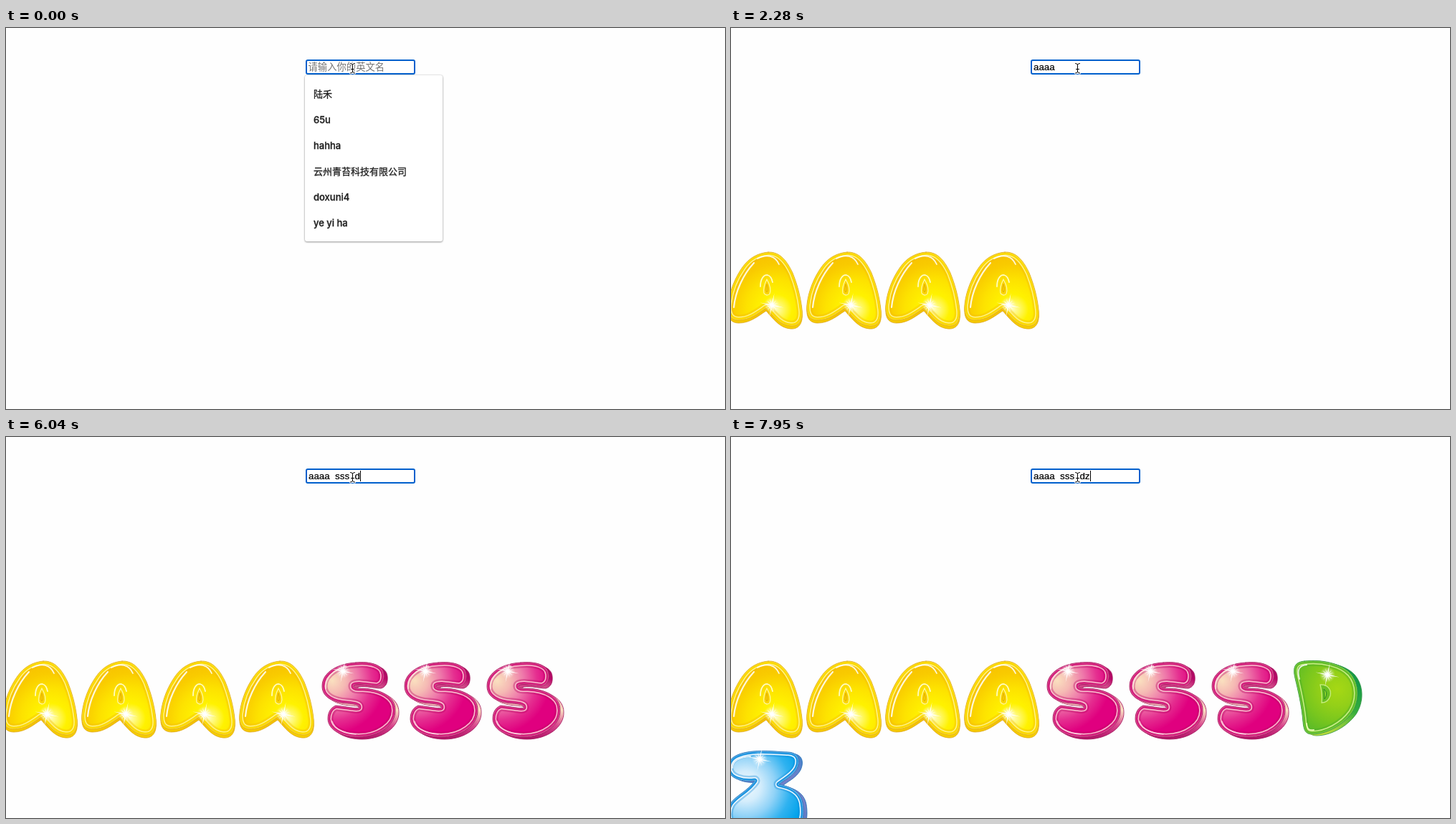
An HTML page that plays this animation: 1003x532 px, repeating every 8000 ms.

```html
<!DOCTYPE html>
<html lang="zh">
<head>
<meta charset="utf-8">
<title>Balloon letters</title>
<style>
html, body { margin: 0; width: 100%; height: 100%; overflow: hidden; background: #fefefe; }
svg { display: block; }
text { white-space: pre; }
.field { font: 13.333px "Liberation Sans", Arial, "Noto Sans CJK SC", "Noto Sans CJK", sans-serif; }
#typed { stroke: #000; stroke-width: .2px; }
.list text { font: 500 13px Inter, "Noto Sans CJK SC", "Noto Sans CJK", sans-serif; fill: #1f1f1f; stroke: #1f1f1f; stroke-width: .3px; }
.panel { fill: #fff; filter: drop-shadow(0 1px 1px rgba(0,0,0,.32)) drop-shadow(0 0 1px rgba(0,0,0,.22)); }
.line { fill: none; stroke-linecap: round; stroke-linejoin: round; }
</style>
</head>
<body>
<svg id="stage" width="1003" height="532" viewBox="0 0 1003 532">
  <defs>
    <radialGradient id="glow">
      <stop offset="0" stop-color="#fff"/>
      <stop offset=".3" stop-color="#fff" stop-opacity=".55"/>
      <stop offset="1" stop-color="#fff" stop-opacity="0"/>
    </radialGradient>
    <path id="beam" d="M480.5 49.5q2.6 0 3 2q.4-2 3-2M483.5 51V61M480.5 63q2.6 0 3-2q.4 2 3 2M481.5 57.5h4"/>
  </defs>

  <rect x="419" y="45" width="151" height="19" rx="2" fill="#fff" stroke="#005fcc" stroke-width="2"/>
  <text id="hint" class="field" x="421.5" y="59" fill="#757575">请输入你的英文名</text>
  <text id="typed" class="field" x="422" y="59"></text>
  <rect id="caret" y="47" width="1" height="15"/>

  <g id="list" class="list">
    <rect class="panel" x="417" y="66" width="192" height="232" rx="3"/>
  </g>
  <g id="letters"></g>

  <g class="line">
    <use href="#beam" stroke="#fff" stroke-width="3"/>
    <use href="#beam" stroke="#000"/>
  </g>
</svg>

<script>
const $ = id => document.getElementById(id);
const LOOP = 8000;
const LEFT = 422;

// time, text, caret shown
const steps = [
  [0, '', 0], [240, '', 1], [720, 'a', 1], [1020, 'aa', 1], [1500, 'aaa', 1],
  [1740, 'aaaa', 1], [2220, 'aaaa', 0], [2700, 'aaaa', 1],
  [3000, 'aaaa ', 1], [3240, 'aaaa  ', 1], [3540, 'aaaa  s', 1],
  [3780, 'aaaa  ss', 1], [4140, 'aaaa  sss', 1], [4610, 'aaaa  sss', 0],
  [4910, 'aaaa  sss ', 1], [5080, 'aaaa  sss  ', 1], [5620, 'aaaa  sss  ', 0],
  [6040, 'aaaa  sss  d', 1], [6510, 'aaaa  sss  d', 0], [6990, 'aaaa  sss  d', 1],
  [7530, 'aaaa  sss  d', 0], [7590, 'aaaa  sss  dz', 1]
];

const line = (d, color, w, o = 1) =>
  `<path class="line" d="${d}" stroke="${color}" stroke-width="${w}" opacity="${o}"/>`;

const stops = colors => colors.map((c, i) =>
  `<stop offset="${i / (colors.length - 1)}" stop-color="${c}"/>`).join('');

function spark(x, y, r) {
  let rays = '';
  for (let i = 0; i < 12; i++) {
    const len = r * (i % 3 ? .55 : 1);
    rays += `<path d="M0-.9L${len} 0L0 .9z" transform="rotate(${i * 30 + 12})"/>`;
  }
  return `<g transform="translate(${x} ${y})" fill="#fff"><circle r="${r * .65}" fill="url(#glow)"/>${rays}</g>`;
}

// A glossy letter: extruded side, face, inset rim line, details, sparkle
function balloon(id, o) {
  const [dx, dy] = o.depth, [cx, cy, r] = o.light, [top, bottom] = o.span;
  let side = '';
  for (let k = 4; k > 0; k--) {
    side += `<path d="${o.d}" transform="translate(${dx * k / 4} ${dy * k / 4})" fill="url(#${id}Side)" stroke="${o.edge}" stroke-width="${k == 4 ? .8 : 0}"/>`;
  }
  return `
    <linearGradient id="${id}Side" gradientUnits="userSpaceOnUse" x1="0" y1="${top}" x2="0" y2="${bottom}">${stops(o.side)}</linearGradient>
    <radialGradient id="${id}Body" gradientUnits="userSpaceOnUse" cx="${cx}" cy="${cy}" r="${r}">${stops(o.body)}</radialGradient>
    <clipPath id="${id}Clip"><path d="${o.d}"/></clipPath>
    <g id="${id}">
      ${side}
      <g clip-path="url(#${id}Clip)">
        <path d="${o.d}" fill="url(#${id}Body)"/>
        ${line(o.d, o.shade, 15, .35)}
        ${line(o.d, o.rim, 10)}
        ${line(o.d, o.band, 7)}
        ${line(o.d, o.rim, 2, .45)}
      </g>
      ${line(o.d, o.edge, .8)}
      ${o.extra}
      ${spark(...o.spark)}
    </g>`;
}

const glyphs = {
  A: {
    d: 'M52 313C69 312 79 327 86 342C92 357 97 374 99 393C101 410 93 417 83 416C68 415 59 402 49 391C37 399 26 408 11 408C-2 408-5 398-4 386C-2 367 6 348 16 334C25 321 38 314 52 313Z',
    depth: [0, 4], span: [312, 421], light: [64, 393, 84],
    side: ['#e8a800', '#f0b000', '#f6d000'], body: ['#fffcb0', '#fff200', '#fde200', '#f9cb00', '#f7bf00'],
    shade: '#f0b400', rim: '#fff38a', band: '#fbd800', edge: '#dfa81c', spark: [57, 387, 17],
    extra: line('M4 390C6 368 17 344 32 328', '#fff', 2.2, .85) +
      line('M37 322C50 315 62 318 67 330', '#fff', 1.8, .85) +
      line('M41 361C41 350 46 344 51 345C55 346 57 350 58 355', '#fffbc0', 1.8) +
      '<path d="M50 351C54 358 56 366 54 371C52 374 47 373 46 370C45 365 47 357 50 351Z" fill="#fbd400" stroke="#fff9a0" stroke-width="1.3"/>' +
      line('M50 358C52 363 52 367 50 369C48 367 49 362 50 358', '#dca400', .8)
  },
  S: {
    d: 'M488 315C508 313 526 318 527 331C528 340 525 346 518 348C508 348 490 343 485 347C484 351 490 351 498 351C522 352 543 362 543 381C544 402 520 419 492 419C468 419 450 409 449 394C449 384 453 378 460 375C472 376 490 380 492 378C493 374 486 373 476 372C456 371 441 363 441 348C441 328 464 316 488 315Z',
    depth: [5, 3], span: [314, 423], light: [455, 340, 74],
    side: ['#a40b5c', '#b80868', '#e88aa8', '#fae6c4', '#d8448c', '#a80a60'],
    body: ['#fae0bf', '#f5b9b4', '#ee78aa', '#e52f90', '#e0007f'],
    shade: '#b4005f', rim: '#fbc3d0', band: '#d2207c', edge: '#a01058', spark: [470, 327, 16],
    extra: line('M446 351C445 336 458 324 474 320', '#fff0e0', 2, .7) +
      line('M455 397C458 408 472 414 488 415', '#ffd5e4', 1.5, .8)
  },
  D: {
    d: 'M800 313C826 310 852 317 864 330C877 345 877 368 866 385C853 403 830 415 811 415C801 415 799 409 798 398C796 374 791 354 787 337C783 321 787 314 800 313Z',
    depth: [6, 2], span: [312, 418], light: [846, 352, 70],
    side: ['#169a48', '#169a48', '#36ae3c', '#d0e23a'], body: ['#a6d814', '#94d018', '#78c61e', '#58b928'],
    shade: '#3fa528', rim: '#cdef8a', band: '#62bd2a', edge: '#258f3a', spark: [832, 332, 17],
    extra: line('M793 338C789 324 793 319 803 318', '#fff', 1.8, .85) +
      line('M803 400C804 408 806 410 813 409', '#f6ffc0', 1.8, .9) +
      '<path d="M822 346C832 345 838 353 836 361C834 368 829 371 824 371C825 362 824 354 822 346Z" fill="#6abf22" stroke="#c8ee80" stroke-width="1.3"/>' +
      '<path d="M827 352Q834 357 828 366Z" fill="#8ed42a" stroke="#2b8a24" stroke-width="1"/>'
  },
  Z: {
    d: 'M-4 462C-4 446 12 441 30 439C50 437 68 440 80 440C95 441 97 452 92 463C86 474 74 479 67 485C82 488 97 494 100 511C103 530 100 545 85 548L10 548C-5 545-8 525-1 512C6 501 24 494 33 480C18 482-4 478-4 462Z',
    depth: [5, 2], span: [438, 550], light: [20, 488, 84],
    side: ['#3a84cc', '#7280c8', '#7280c8', '#4a74c0'], body: ['#f2fafe', '#d4edfc', '#8fd2f7', '#2fb2f0', '#00a2ea'],
    shade: '#0f86d8', rim: '#f4fbff', band: '#2196e0', edge: '#1668b4', spark: [40, 450, 17],
    extra: line('M2 462C2 451 13 447 27 446', '#fff', 2, .8)
  }
};

// glyph, time it appears, count, spacing
const rows = [['A', 2280, 4, 110], ['S', 4370, 3, 115], ['D', 6460, 1, 0], ['Z', 7950, 1, 0]];

$('stage').querySelector('defs').innerHTML +=
  Object.keys(glyphs).map(k => balloon(k, glyphs[k])).join('');
$('letters').innerHTML = rows.map(([k, at, n, gap]) =>
  `<g data-at="${at}">${Array.from({ length: n }, (_, i) => `<use href="#${k}" x="${i * gap}"/>`).join('')}</g>`).join('');
$('list').innerHTML += ['陆禾', '65u', 'hahha', '云州青苔科技有限公司', 'doxuni4', 'ye yi ha']
  .map((s, i) => `<text x="429" y="${97 + 36 * i}">${s}</text>`).join('');

// Arial advances in em
const em = { a: .5562, s: .5, d: .5562, z: .5, ' ': .2778 };
const caretX = s => Math.round(LEFT + [...s].reduce((w, c) => w + em[c] * 13.333, 0));
const groups = [...$('letters').children];
let shown = null;

function frame() {
  const t = performance.now() % LOOP;
  const step = steps.findLast(s => s[0] <= t);
  if (step !== shown) {
    shown = step;
    const [, text, on] = step;
    $('typed').textContent = text;
    $('hint').style.display = text ? 'none' : '';
    $('caret').setAttribute('x', caretX(text));
    $('caret').style.display = on ? '' : 'none';
  }
  $('list').style.opacity = t < 780 ? 1 : t < 840 ? .5 : 0;
  for (const g of groups) g.style.display = t >= g.dataset.at ? '' : 'none';
  requestAnimationFrame(frame);
}
frame();
</script>
</body>
</html>
```
